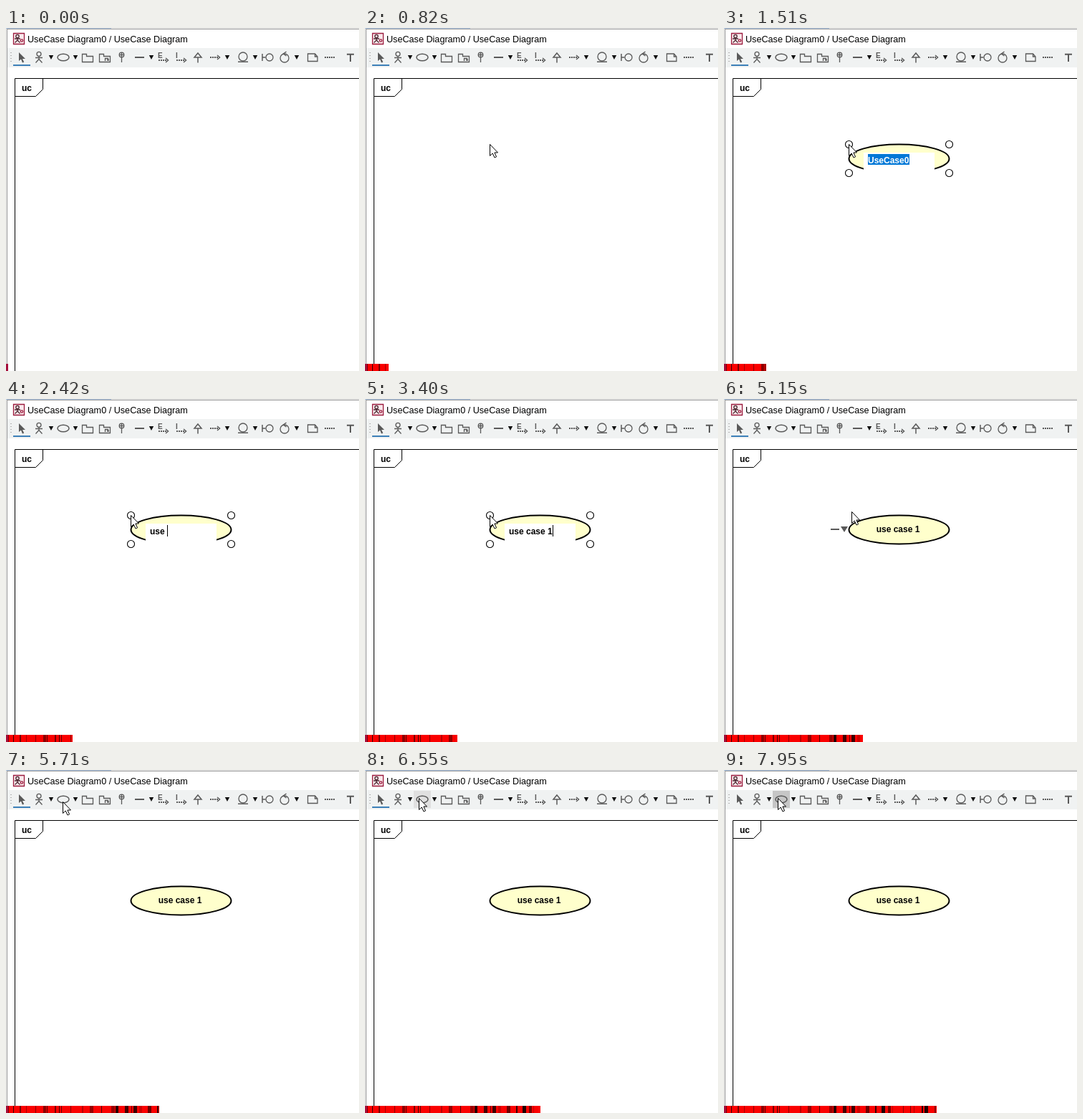
An HTML page with a canvas for the animation above (8 s loop, 493 by 479 pixels).

```html
<!DOCTYPE html>
<html lang="en">
<head>
<meta charset="utf-8">
<title>Use case editor</title>
<style>
  html, body { margin: 0; width: 100%; height: 100%; overflow: hidden; background: #fff; }
  canvas { display: block; }
</style>
</head>
<body>
<canvas id="stage" width="493" height="479"></canvas>
<script>
const ctx = document.getElementById('stage').getContext('2d');
const LOOP = 8000;
const INK = '#595959';
const FONT = '"Liberation Sans", Arial, sans-serif';
const LABEL = 'use case 1';

// Moments at which the editor changes state, in ms.
const CREATED = 1080, TYPING = 1960, KEY_DELAY = 138, COMMITTED = 3700, DESELECTED = 4640;
const QUICK_ON = 4930, QUICK_OFF = 5300, HOVER = 5720;
const TIP_ON = 6620, TIP_OFF = 7400, PICKED = 7640;
const CLICKS = [690, 900, 4580, 7390];

const POINTER_START = { x: 434, y: 479 };
const MOVES = [
  { start: 70, end: 680, x: 174, y: 162 },
  { start: 3980, end: 4240, x: 115, y: 176 },
  { start: 4300, end: 4540, x: 110, y: 232 },
  { start: 4680, end: 5010, x: 178, y: 157 },
  { start: 5200, end: 5780, x: 75, y: 39 }
];

function rect(x, y, w, h, color) {
  ctx.fillStyle = color;
  ctx.fillRect(x, y, w, h);
}

function text(str, x, y, font = 'bold 12px', color = '#000', align = 'left') {
  ctx.font = `${font} ${FONT}`;
  ctx.fillStyle = color;
  ctx.textAlign = align;
  ctx.fillText(str, x, y);
}

function shape(d, { stroke = INK, fill, width = 1.3, dash = [] } = {}) {
  const path = new Path2D(d);
  if (fill) { ctx.fillStyle = fill; ctx.fill(path); }
  if (!stroke) return;
  ctx.strokeStyle = stroke;
  ctx.lineWidth = width;
  ctx.setLineDash(dash);
  ctx.stroke(path);
  ctx.setLineDash([]);
}

function oval(x, y, rx, ry = rx, { stroke = INK, fill, width = 1.3 } = {}) {
  ctx.beginPath();
  ctx.ellipse(x, y, rx, ry, 0, 0, Math.PI * 2);
  if (fill) { ctx.fillStyle = fill; ctx.fill(); }
  if (stroke) { ctx.strokeStyle = stroke; ctx.lineWidth = width; ctx.stroke(); }
}

function dashedArrow(x, y, letter = '') {
  text(letter, x - 1, y - 3, 'bold 10px', INK);
  shape(`M${x} ${y}h11`, { width: 2, dash: [2, 1] });
  shape(`M${x + 10} ${y - 3}l3.5 3l-3.5 3`, { width: 1.5 });
}

function titleBar() {
  rect(0, 0, 493, 1, '#f0f0f0');
  rect(0, 0, 147, 1, '#a8c0de');
  rect(0, 1, 1, 478, '#f0f0f0');
  rect(1, 1, 492, 1, '#969696');
  rect(1, 1, 1, 478, '#969696');
  shape('M10.5 7.5h15v15h-15z', { stroke: '#9b1c3e', fill: '#fbe9ec' });
  oval(16, 11.5, 2.2, 2.2, { stroke: '#4a2730' });
  shape('M12 15h8M16 13.5v3.5l-3.5 3.5M16 17l3.5 3.5', { stroke: '#4a2730' });
  oval(22, 17.5, 1.7, 1.7, { stroke: '#9b1c3e' });
  text('UseCase Diagram0 / UseCase Diagram', 30, 20, '12.64px');
}

function toolbar(t) {
  rect(2, 28, 491, 27, '#f0f2f2');
  for (let y = 34; y < 50; y += 4) rect(6, y, 2, 1, '#b4b4b4');
  if (t < PICKED) rect(10, 51, 24, 2, '#3c80b8');
  if (t >= HOVER) rect(68, 29, 24, 24, t < PICKED ? '#e0e0e0' : '#c6c6c6');

  // Selection arrow, actor, use case, packages, containment.
  shape('M18 34v12l3-2.5 2 5 2.2-1-2.2-4.5h4z', { stroke: null, fill: INK });
  oval(46, 36.3, 3);
  shape('M41 41.5h10M46 39.5v4l-4.5 5M46 43.5l4.5 5');
  oval(80, 41, 8, 4.8, { width: 1.5 });
  for (const x of [106.5, 130.5]) shape(`M${x} 47.5v-11h6v3h9v8z`);
  shape('M138.5 46v-3.5h4V46M141 44.5h3');
  oval(161.5, 37.5, 3.3);
  shape('M161.5 34v14M158.5 37.5h6');

  // Relations.
  shape('M180 41h13', { width: 2 });
  dashedArrow(213, 45, 'E');
  dashedArrow(238, 45, 'I');
  shape('M268 35l5 6h-10zM268 41v7.5', { width: 1.5 });
  dashedArrow(285, 41);

  // Entity, boundary, control.
  oval(331, 40, 6);
  shape('M324 47.3h14M358 36v10M358 41h4.5', { width: 1.5 });
  oval(368, 41, 5);
  oval(389, 42, 6);
  shape('M391.5 33l-4 3 4 3', { width: 1.5 });

  // Note, anchor, text.
  shape('M421.5 36h10l3.5 4v6.5h-13.5zM431.5 36v4h3.5');
  shape('M445 41h14', { width: 2, dash: [2, 1] });
  shape('M476 36.8h10M481 36v11', { width: 2 });

  for (const x of [63, 97, 203, 309, 348, 406])
    shape(`M${x - 3.2} 38h6.4l-3.2 6z`, { stroke: null, fill: '#111' });
}

function diagramFrame() {
  shape('M493 70.5H12.5V479M51.5 70.5V85.5L41.5 95.5H12.5', { stroke: '#000', width: 1 });
  text('uc', 22, 88);
}

function handles(left, top, right, bottom) {
  for (const x of [left, right])
    for (const y of [top, bottom])
      oval(x, y, 5, 5, { stroke: '#000', fill: '#fff', width: 1.1 });
}

function nameField(t) {
  rect(195, 174, 99, 31, '#fff');
  if (t < TYPING) {
    rect(201, 176, 58, 15, '#0078d7');
    text('UseCase0', 201, 189, 'bold 12px', '#fff');
    return;
  }
  const typed = LABEL.slice(0, 1 + Math.floor((t - TYPING) / KEY_DELAY));
  text(typed, 201, 189);
  rect(201 + Math.round(ctx.measureText(typed).width), 176, 1, 16, '#000');
}

function useCase(t) {
  if (t < CREATED) return;
  oval(244.5, 182.5, 70, 20, { stroke: '#000', fill: '#ffffcc', width: 2 });
  if (t < COMMITTED) nameField(t);
  else text(LABEL, 243, 186, 'bold 12px', '#000', 'center');

  if (t < DESELECTED) {
    handles(174.5, 162.5, 314.5, 202.5);
    if (t >= COMMITTED) handles(194.5, 174.5, 293.5, 189.5);
  }
  if (t >= QUICK_ON && t < QUICK_OFF) {
    rect(149, 181, 12, 2, INK);
    shape('M163 178h10l-5 8z', { stroke: null, fill: INK });
  }
}

function tooltip(t) {
  if (t < TIP_ON || t >= TIP_OFF) return;
  shape('M75.5 59.5h54v18h-54z', { stroke: '#767676', fill: '#fff', width: 1 });
  text('UseCase', 79, 73, '12px');
}

function pointer(t) {
  if (t < MOVES[0].start) return;
  let { x, y } = POINTER_START;
  for (const move of MOVES) {
    const p = Math.min(1, Math.max(0, (t - move.start) / (move.end - move.start)));
    const ease = p * p * (3 - 2 * p);
    x += (move.x - x) * ease;
    y += (move.y - y) * ease;
  }
  x = Math.round(x);
  y = Math.round(y);

  if (CLICKS.some(click => t >= click && t < click + 110))
    oval(x, y, 12, 12, { stroke: null, fill: 'rgba(255,255,0,.47)' });
  shape(`M${x + .5} ${y + .5}v16l3.7-3.5 2.8 6 2.6-1.2-2.7-5.8h4.6z`,
    { stroke: '#000', fill: '#fff', width: 1 });
}

// Red bar with dark stripes of seeded random place, width and strength.
function progress(t) {
  const end = Math.round(3 + t * .037);
  let seed = 11;
  const random = () => (seed = seed * 16807 % 2147483647) / 2147483647;
  rect(0, 469, end, 10, '#fa0000');
  for (let x = 3; x < end; x += 3 + 14 * random()) {
    const left = Math.floor(x), width = 1 + Math.floor(5 * random() ** 2);
    rect(left, 469, Math.min(width, end - left), 10, `rgba(20,0,0,${.2 + .75 * random()})`);
  }
  rect(0, 469, 3, 10, '#a50f3c');
}

function draw(t) {
  rect(0, 0, 493, 479, '#fff');
  titleBar();
  toolbar(t);
  diagramFrame();
  useCase(t);
  tooltip(t);
  pointer(t);
  progress(t);
}

const start = performance.now();
function tick() {
  draw((performance.now() - start) % LOOP);
  requestAnimationFrame(tick);
}
tick();
</script>
</body>
</html>
```
